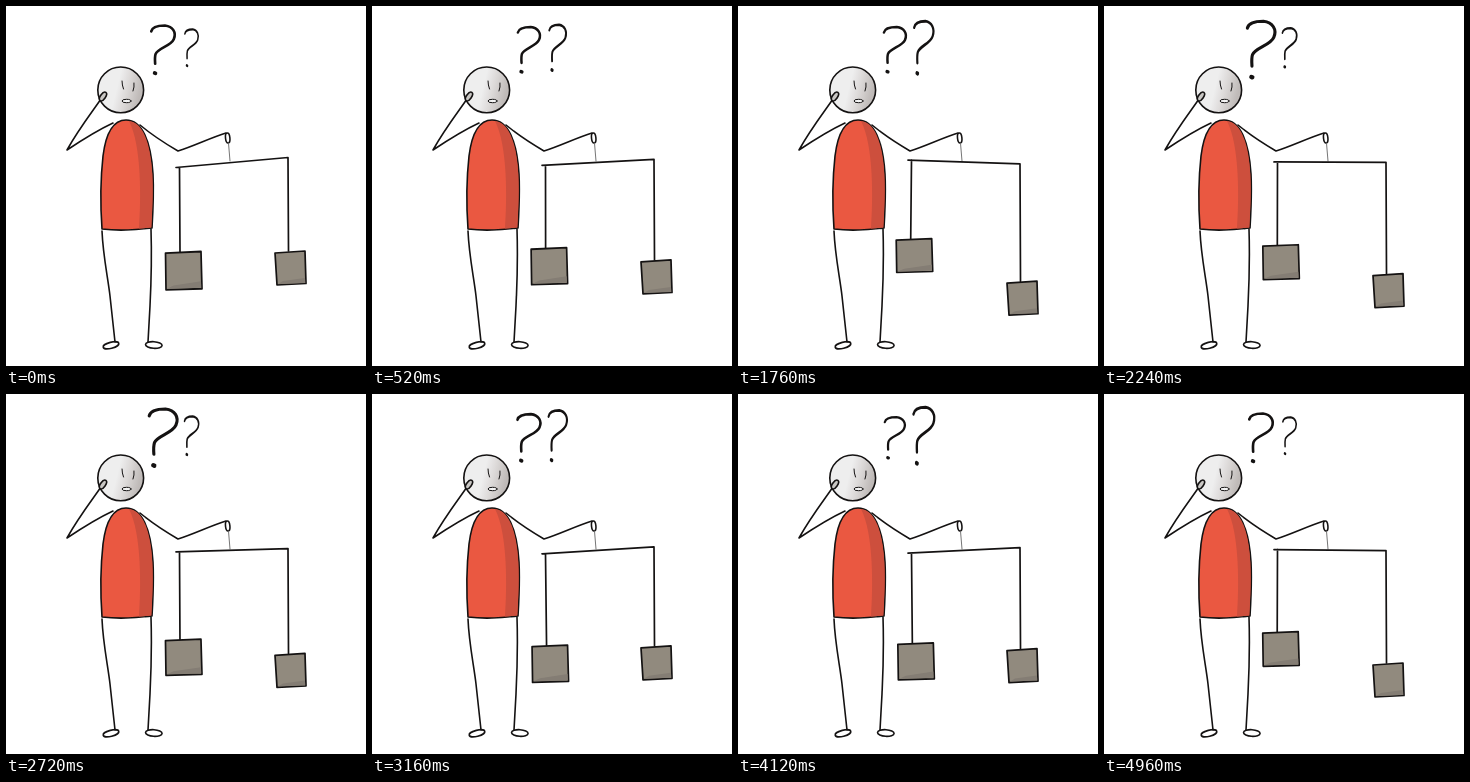
An HTML page for the animation above (5 s loop, 360 px wide and 360 px high).

```html
<!DOCTYPE html>
<html lang="en">
<head>
<meta charset="utf-8">
<style>
html, body { margin: 0; width: 100%; height: 100%; overflow: hidden; background: #fff; }
svg { display: block; width: 100vw; height: 100vh; }
.ink { fill: none; stroke: #141212; stroke-width: 1.6; stroke-linecap: round; stroke-linejoin: round; }
</style>
</head>
<body>
<svg viewBox="0 0 360 360">
  <defs>
    <linearGradient id="skin" x2="1" y2=".25">
      <stop offset=".5" stop-color="#eee"/>
      <stop offset=".72" stop-color="#dcd9d8"/>
      <stop offset="1" stop-color="#bfbab8"/>
    </linearGradient>
    <g id="mark">
      <path d="M-11 -19C-10 -24 -3 -25 3 -25C11 -24 15 -18 12 -11C9 -4 -4 -2 -6.500 4Q-7.500 7 -7 14"/>
      <path stroke-width="3.800" d="M-7.500 23.500l.8 .3"/>
    </g>
  </defs>

  <g class="ink">
    <!-- legs and feet -->
    <path d="M96 225C97 250 102 272 104 290L109 336M145 223C146 255 145 280 144 300L142 336"/>
    <ellipse cx="105" cy="339.300" rx="8" ry="3" transform="rotate(-14 105 339.300)"/>
    <ellipse cx="147.800" cy="339" rx="8.300" ry="3.300" transform="rotate(3 147.800 339)"/>
    <!-- arms -->
    <path d="M95 93C86 106 72 124 61 144C76 134 92 124 107 117M134 119C146 129 160 138 172 145C188 140 204 132 220 127"/>
    <ellipse cx="221.700" cy="132" rx="2.200" ry="5" transform="rotate(-6 221.700 132)"/>
    <!-- torso -->
    <path fill="#ea5841" d="M96 223C94 195 95 168 97 150C100 126 108 114 120 114C136 114 145 135 147 168C148 188 147 205 146 222C130 224 112 225 96 223Z"/>
    <path fill="#cd4f3d" stroke="none" d="M123 115C136 116 144.500 135 146.300 168C147.300 188 146.300 205 145.300 221.500L133 222.500C135 195 136 140 123 115Z"/>
    <!-- head -->
    <circle cx="114.700" cy="83.900" r="22.900" fill="url(#skin)"/>
    <g stroke-width="1">
      <path d="M116 75Q116 79 117.500 83M128 77Q128.500 81 127 85"/>
      <ellipse cx="120.500" cy="95" rx="4.500" ry="1.700" fill="#f4f4f4"/>
    </g>
    <ellipse cx="97" cy="90.500" rx="2.500" ry="5" fill="#c9c7c4" transform="rotate(35 97 90.500)"/>
  </g>

  <g class="ink" style="stroke-width:1.7">
    <path d="M222.500 137L224 155" stroke="#666" stroke-width=".9"/>
    <path id="rig"/>
    <g id="leftBlock">
      <path fill="#918a7e" d="M0 1L35.500 -.5L36.500 34L.5 35Z"/>
      <path fill="#847d74" stroke="none" d="M1.500 34L8 31L35.500 27L35.800 33Z"/>
    </g>
    <g id="rightBlock">
      <path fill="#918a7e" d="M0 2L30 0L31 32.500L2 34Z"/>
      <path fill="#847d74" stroke="none" d="M3 33L8 30L30 27L30.300 32Z"/>
    </g>
  </g>

  <g class="ink" style="stroke-width:2.7">
    <use id="leftMark" href="#mark"/>
    <use id="rightMark" href="#mark"/>
  </g>
</svg>
<script>
const LOOP = 5000, STEP = 40, HALF_SWING = 1780;
const $ = id => document.getElementById(id);
const mix = (a, b, u) => a + (b - a) * u;

function place(id, x, y, sx = 1, sy = 1) {
  $(id).setAttribute('transform', `translate(${x} ${y}) scale(${sx} ${sy})`);
}

// The beam swings at constant speed: 0 = right side up, 1 = left side up.
function drawMobile(t) {
  const phase = t / HALF_SWING % 2;
  const swing = 1 - Math.abs(1 - phase);
  const beamLeft = mix(161.5, 154, swing), beamRight = mix(151.5, 158, swing);
  const rightTop = mix(245, 275.5, swing);
  // The left weight starts its first swing from a higher rest.
  const leftTop = mix(t < HALF_SWING ? 246 : 257, 233, swing);
  const shift = (leftTop - 246) * 0.1;
  $('rig').setAttribute('d',
    `M170 ${beamLeft}L282 ${beamRight}L282.500 ${rightTop}M173.500 ${beamLeft}L${174 + shift} ${leftTop}`);
  place('leftBlock', 159.5 + shift, leftTop, 1, mix(1.08, 0.95, swing));
  place('rightBlock', 269, rightTop);
}

// The marks grow in turn, twice per loop; the left one grows most mid-loop.
function drawMarks(t) {
  const turn = t / LOOP * 2 * Math.PI;
  const pulse = (1 + Math.cos(2 * turn)) / 2;
  const reach = mix(21, 10, (1 + Math.cos(turn)) / 2);
  const left = (40 + reach * pulse) / 51;
  const right = mix(64, 38, pulse) / 51;
  place('leftMark', 156, 44, left, left);
  place('rightMark', 185, 42, right * 0.75, right);
}

function draw() {
  const t = Math.floor(performance.now() % LOOP / STEP) * STEP;
  drawMobile(t);
  drawMarks(t);
  requestAnimationFrame(draw);
}
draw();
</script>
</body>
</html>
```
